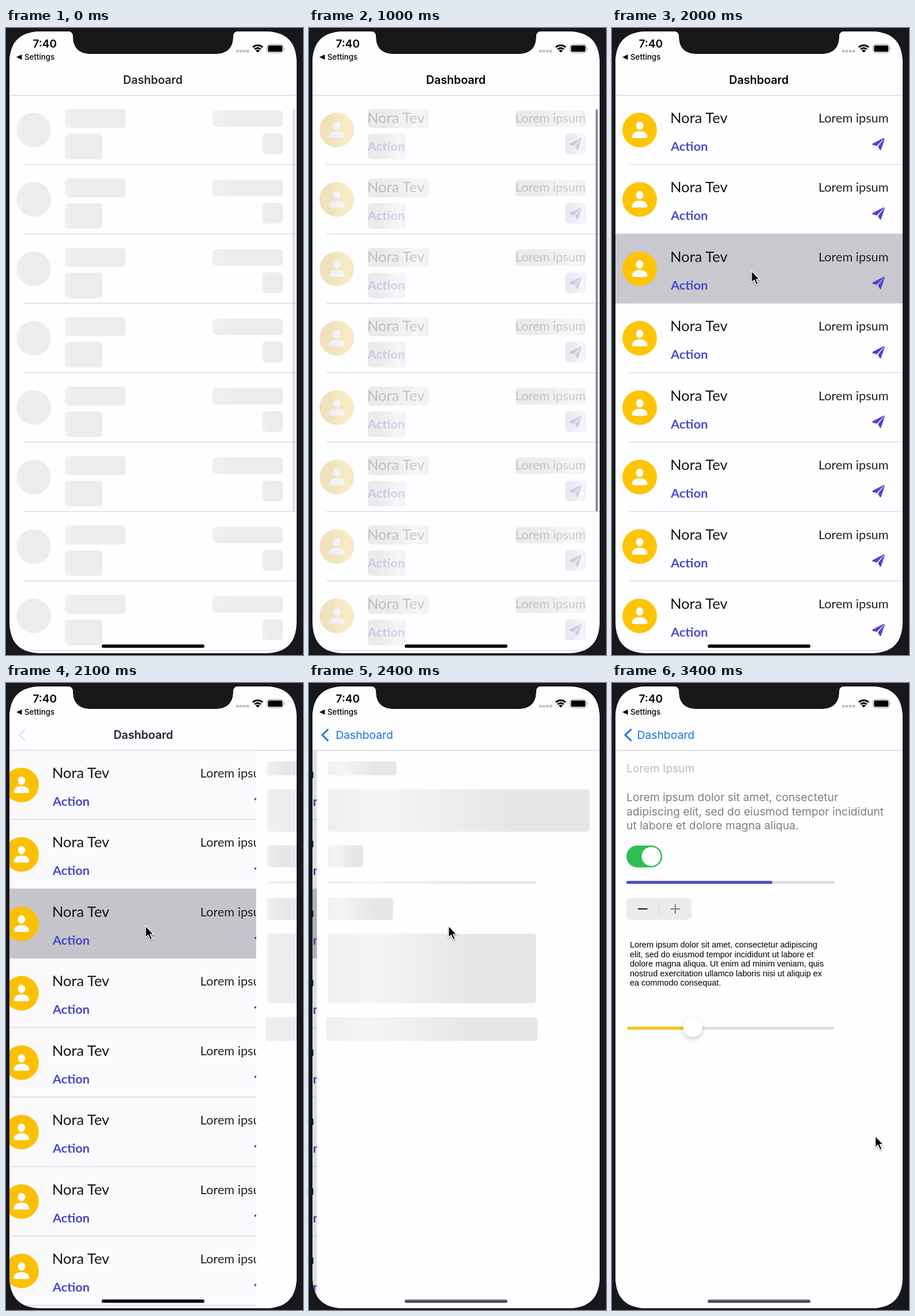
An HTML page that plays this animation: 515x1088 px, repeating every 3.5 s.

```html
<!DOCTYPE html>
<html lang="en">
<head>
<meta charset="utf-8">
<title>Skeleton dashboard</title>
<style>
html, body { margin: 0; height: 100%; overflow: hidden; background: #18171a; }
svg { display: block; width: 515px; height: 1088px; }
text { font-family: Inter, Roboto, sans-serif; font-size: 19.3px; white-space: pre; }
.list text { font-family: Lato, "Open Sans", sans-serif; }
.list .name { font-size: 25.5px; fill: #161518; }
.list .action { font-size: 21.8px; font-weight: 700; fill: #4b48cb; }
.list .note { font-size: 21.7px; fill: #222125; text-anchor: end; }
.box text { font-family: "Liberation Sans", Arial, sans-serif; font-size: 14.44px; }
.bone { fill: url(#shimmer); }
.blue { fill: #0f74e6; }
</style>
</head>
<body>
<svg viewBox="0 0 515 1088">
  <defs>
    <linearGradient id="shimmer"><stop/><stop offset=".5"/><stop offset="1"/></linearGradient>
    <linearGradient id="bar" x2="0" y2="1"><stop stop-color="#777"/><stop offset="1" stop-color="#333"/></linearGradient>
    <filter id="shadow" x="-50%" y="-50%" width="200%" height="200%">
      <feDropShadow dx="0" dy="4" stdDeviation="4" flood-opacity=".2"/>
    </filter>
    <filter id="soft" x="-50%" y="-50%" width="200%" height="200%">
      <feDropShadow dx="0" dy="1.5" stdDeviation="1.2" flood-opacity=".4"/>
    </filter>
    <path id="screenShape" d="M6 62C6 24 24 6 62 6H107Q116 6 116 15C116 35 127 45 147 45H363C383 45 394 35 394 15Q394 6 403 6H448C486 6 504 24 504 62V1029C504 1067 486 1085 448 1085H62C24 1085 6 1067 6 1029Z"/>
    <clipPath id="screen"><use href="#screenShape"/></clipPath>
  </defs>

  <g clip-path="url(#screen)">
    <rect width="515" height="1088" fill="#fefdff"/>

    <g id="list" class="list">
      <rect id="highlight" x="6" y="357" width="498" height="121" fill="#c9c8ce"/>
      <g id="lines" fill="#cfced2"></g>
      <g id="listBones"></g>
      <g id="rows"></g>
      <rect id="scroll" x="497" y="141" width="4" height="698" rx="2" fill="#8f8e92"/>
    </g>
    <rect id="dim" y="117" width="515" height="971"/>

    <g id="detail">
      <rect x="6" y="117" width="498" height="971" fill="#fefdff"/>
      <g id="detailBones"></g>
      <g id="content">
        <text x="25" y="155" fill="#bcbbbf">Lorem Ipsum</text>
        <g id="intro" fill="#7f7e82"></g>
        <rect x="25" y="282" width="62" height="38" rx="19" fill="#2fbe51"/>
        <circle cx="68" cy="301" r="16.5" fill="#fff"/>
        <rect x="25" y="343.5" width="361" height="5" rx="2.5" fill="#dddce0"/>
        <rect x="25" y="343.5" width="253" height="5" rx="2.5" fill="#4b48cb"/>
        <rect x="25" y="373" width="113" height="38" rx="7.5" fill="#ebeaec"/>
        <path d="M45 392H61.500" stroke="#111" stroke-width="2"/>
        <path d="M81.500 382V403" stroke="#cfced2"/>
        <path d="M101.500 392H118M109.700 383.800V400.200" stroke="#7b7a7d" stroke-width="2"/>
        <g id="box" class="box"></g>
        <rect x="26" y="596.500" width="359" height="5" rx="2.5" fill="#dddce0"/>
        <rect x="26" y="596.500" width="114" height="5" rx="2.5" fill="#f9c50f"/>
        <circle cx="140" cy="597.500" r="16.5" fill="#fff" filter="url(#shadow)"/>
      </g>
    </g>

    <rect width="515" height="117" fill="#fefdff"/>
    <path d="M6 117H504" stroke="#c6c5c9" stroke-width="1.2"/>
    <path id="back" d="M33.500 80L23 90.300L33.500 100.500" fill="none" stroke="#0f74e6" stroke-width="2.8"/>
    <text id="title" y="97" font-weight="600" style="font-size:19.6px">Dashboard</text>
    <text id="backLabel" y="97" class="blue">Dashboard</text>

    <text x="46.500" y="34" font-weight="600" style="font-size:19px">7:40</text>
    <path d="M18 50.500L27.500 46V55Z"/>
    <text x="32" y="55" font-weight="500" style="font-size:13.3px">Settings</text>
    <path d="M399 40.300H422" stroke="#c0bfc3" stroke-width="4.6" stroke-dasharray="4.6 1.4"/>
    <g fill="none" stroke="#000" stroke-width="3">
      <path d="M428 33.500A12 12 0 0 1 445 33.500M431.200 37A7.600 7.600 0 0 1 441.800 37"/>
    </g>
    <path d="M436.500 42.500L433 39.200A5 5 0 0 1 440 39.200Z"/>
    <rect x="452.500" y="28.500" width="28.500" height="14.500" rx="4.300" fill="none" stroke="#99989c"/>
    <rect x="454.300" y="30.300" width="25" height="11" rx="2.600"/>
    <path d="M482.300 33.500Q484.500 35.800 482.300 38Z" fill="#99989c"/>
    <rect id="home" x="166" y="1069.800" width="178" height="5.700" rx="2.850"/>

    <path id="cursor" d="M0 0V20L4.600 15.800L8.200 24L11.400 22.600L8 14.700H14Z" stroke="#fff" stroke-width="1.3" filter="url(#soft)"/>
  </g>
</svg>

<script>
const $ = id => document.getElementById(id);
const LOOP = 3500, STEP = 100, ROW = 120.45, WIDTH = 498;

const bone = (x, y, w, h, r = 5) =>
  `<rect class="bone" x="${x}" y="${y}" width="${w}" height="${h}" rx="${r}"/>`;
const repeat = part => Array.from({ length: 8 }, (_, i) =>
  `<g transform="translate(0 ${i * ROW})">${part}</g>`).join('');
const paragraph = (x, y, pitch, lines) => lines.map((line, i) =>
  `<text x="${x}" y="${y + i * pitch}">${line}</text>`).join('');

$('lines').innerHTML = repeat('<rect x="30" y="236.2" width="474" height="1"/>');
$('listBones').innerHTML = repeat(
  bone(18, 147, 60, 60, 30) + bone(102, 140.5, 105.5, 33, 6) + bone(102, 183.5, 65, 44.5, 6) +
  bone(358, 143, 122, 28.5, 6) + bone(444, 183, 36, 36, 6));
$('rows').innerHTML = repeat(`
  <circle cx="48" cy="177" r="30" fill="#ffc400"/>
  <g fill="#fff">
    <ellipse cx="48" cy="169.5" rx="6.3" ry="7.3"/>
    <path d="M37 191Q34.5 191 34.5 188.500C35 182 41 179 48 179S61 182 61.500 188.500Q61.500 191 59 191Z"/>
  </g>
  <text class="name" x="101" y="165">Nora Tev</text>
  <text class="action" x="102" y="213">Action</text>
  <text class="note" x="479.5" y="164">Lorem ipsum</text>
  <path d="M471.500 191L452 201V202.500L459.300 204.300ZM472.500 192L461.800 205.700L464.800 211.500H466Z"
    fill="#4b48cb" stroke="#4b48cb" stroke-linejoin="round"/>`);

$('detailBones').innerHTML = [
  [25, 136, 119, 24.5], [25, 184.5, 454, 73.5], [25, 282, 61.5, 37.5], [25, 343.8, 361, 4.7, 2],
  [25, 373, 113, 38], [25, 435, 361, 120.5], [22.5, 580, 366, 41]
].map(b => bone(...b)).join('');
$('intro').innerHTML = paragraph(25, 205, 24.5, [
  'Lorem ipsum dolor sit amet, consectetur',
  'adipiscing elit, sed do eiusmod tempor incididunt',
  'ut labore et dolore magna aliqua.']);
$('box').innerHTML = paragraph(31, 459, 16.55, [
  'Lorem ipsum dolor sit amet, consectetur adipiscing',
  'elit, sed do eiusmod tempor incididunt ut labore et',
  'dolore magna aliqua. Ut enim ad minim veniam, quis',
  'nostrud exercitation ullamco laboris nisi ut aliquip ex',
  'ea commodo consequat.']);

const ramp = (t, from, to) => Math.min(1, Math.max(0, (t - from) / (to - from)));
const mix = (a, b, p) => a + (b - a) * p;
const fade = (id, value) => $(id).setAttribute('opacity', value);
const move = (id, x, y = 0) => $(id).setAttribute('transform', `translate(${x} ${y})`);

// Critically damped spring
function push(t) {
  const x = Math.max(0, t - 2064) * 0.01826;
  return 1 - (1 + x) * Math.exp(-x);
}

function setShimmer(t) {
  const early = t < 600;
  const peak = early ? -0.25 : t < 2000 ? 0.8 : mix(-0.2, 0.8, ramp(t, 2200, 2700));
  const base = early ? '#ecebed' : '#e6e5e8';
  $('shimmer').setAttribute('x1', peak - 0.5);
  $('shimmer').setAttribute('x2', peak + 0.5);
  [base, '#f5f4f6', base].forEach((color, i) =>
    $('shimmer').children[i].setAttribute('stop-color', color));
}

function draw(t) {
  const p = push(t), wake = ramp(t, 0, 300);
  const loaded = ramp(t, 950, 1200), filled = ramp(t, 3150, 3400);
  setShimmer(t);

  fade('listBones', 1 - loaded);
  fade('rows', loaded);
  fade('scroll', mix(0.28, 1, wake) * (1 - ramp(t, 1200, 1500)));
  fade('highlight', t >= 1800 ? 1 : 0);
  move('list', -0.3 * WIDTH * p);
  fade('dim', 0.125 * p);

  move('detail', WIDTH * (1 - p));
  fade('detailBones', 1 - filled);
  fade('content', filled);

  const titleX = mix(203, 43.5, p ** 1.15);
  move('title', titleX + 1.5 * p);
  move('backLabel', titleX);
  fade('title', mix(0.84, 1, wake) * (1 - p));
  fade('backLabel', p);
  fade('back', p);
  $('home').setAttribute('fill', t >= 2200 ? 'url(#bar)' : '#000');

  const away = t < 2000 ? (1 - ramp(t, 1100, 1400)) ** 2 : ramp(t, 3200, 3400);
  move('cursor', mix(242, 456.5, away), mix(421.5, 786, away));
  fade('cursor', t >= 1200 ? 1 : 0);
}

const start = performance.now();
function tick() {
  const t = (performance.now() - start) % LOOP;
  draw(Math.floor(t / STEP) * STEP);
  requestAnimationFrame(tick);
}
tick();
</script>
</body>
</html>
```
